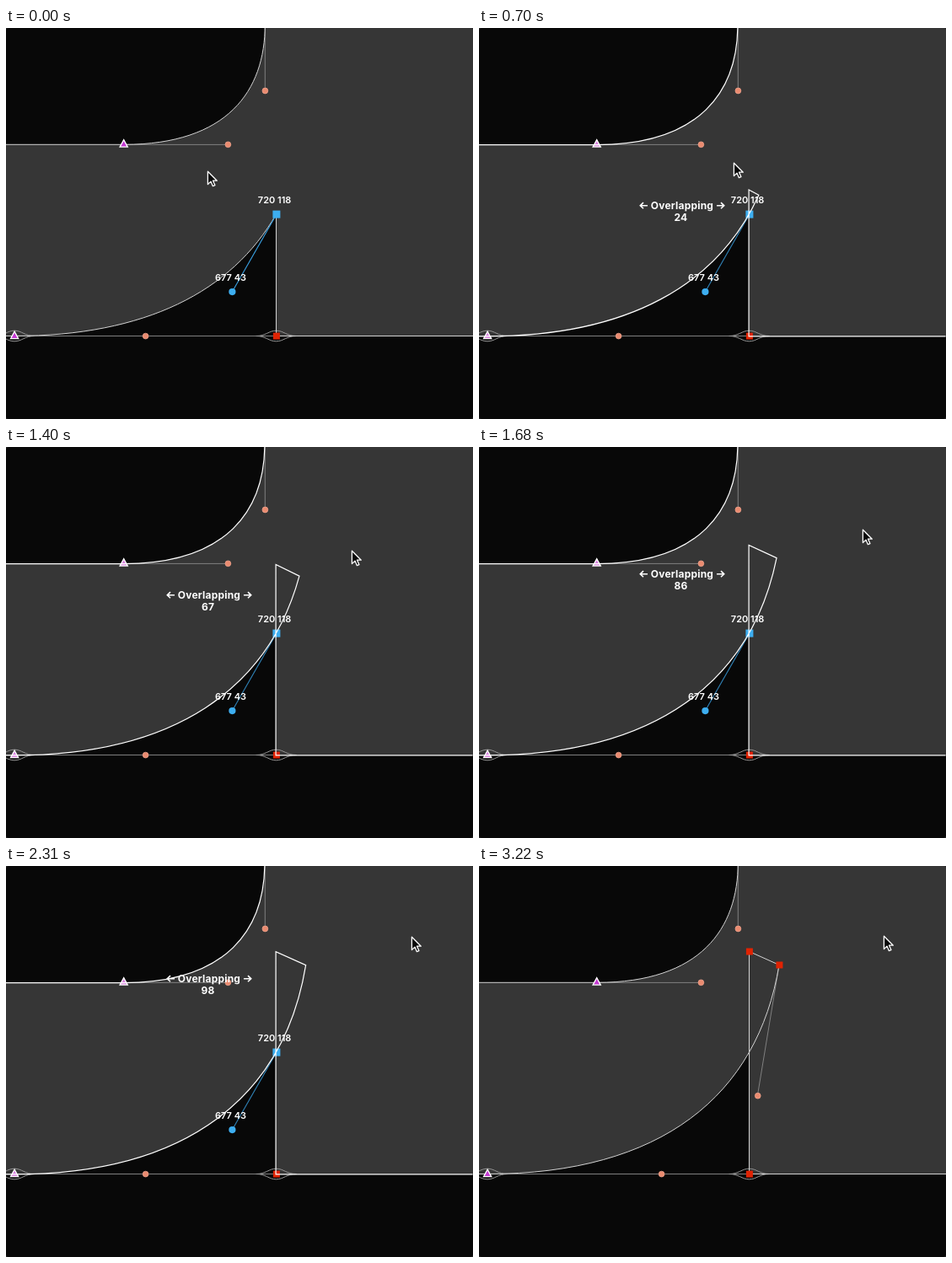
Write an HTML page that moves like this. It is 554 px wide and 464 px high and loops after 4200 ms.

```html
<!DOCTYPE html>
<html lang="en">
<head>
<meta charset="utf-8">
<title>Overlapping corner</title>
<style>
html, body { margin: 0; width: 100%; height: 100%; overflow: hidden; background: #262626; }
svg { display: block; width: 100%; height: 100%; border-radius: 3px; }
text { font-family: Inter, sans-serif; fill: #fff; text-anchor: middle; }
.coord { font-size: 11px; font-weight: 600; }
.tip { font-size: 12px; font-weight: 700; letter-spacing: .2px; }
.line { fill: none; stroke: #808080; stroke-width: 1; }
.thin { fill: none; stroke: #d4d4d4; stroke-width: 1; }
.bold { fill: none; stroke: #fff; stroke-width: 1.2; }
.handle { fill: #ea8b70; stroke: #f3a892; stroke-width: .7; }
.red { fill: #e02303; }
.blue { fill: #3daef0; }
.smooth { stroke: #fff; stroke-width: 1.3; }
</style>
</head>
<body>
<svg viewBox="0 0 554 464">
  <rect width="554" height="464" fill="#363636"/>
  <g fill="#080808">
    <path id="upper"/>
    <path d="M0 365.6H10C165 365.6 268 313 320.3 221V365.6H554V464H0Z"/>
  </g>
  <g class="line">
    <path d="M140 138.4H263M307.3 0V74M0 365.5H320"/>
    <path id="flares" stroke="#959595"/>
    <path id="arm"/>
  </g>
  <path id="outline" class="thin"/>
  <path id="blueArm" d="M320.8 221.2L268.4 313" stroke="#3aa2e4" stroke-width="1.1"/>
  <g id="marks" transform="translate(.4 .1)"></g>
  <path id="drag" class="bold" transform="translate(-.4 .3)"/>
  <g id="labels">
    <text class="coord" x="318.6" y="208">720 118</text>
    <text class="coord" x="266.5" y="300">677 43</text>
  </g>
  <g id="tip">
    <path d="M200 0H191.5M195 -3.6L191.3 0L195 3.6M282 0H290.5M287 -3.6L290.7 0L287 3.6"
      fill="none" stroke="#fff" stroke-width="1.6"/>
    <text class="tip" x="241" y="4">Overlapping</text>
    <text class="tip" id="amount" x="239.5" y="18"></text>
  </g>
  <path id="cursor" d="M.5 .5V15.8L4.1 12.4L6.5 18L9 16.9L6.6 11.5H11.4Z"
    fill="#080808" stroke="#fff" stroke-width="1.3" stroke-linejoin="round"/>
</svg>
<script>
const LOOP = 4200, STEP = 70, START = 350, NUDGE = 2870, DROP = 3150;
const UNIT = 1.22;      // pixels per font unit
const STRETCH = .00337; // curve parameter per font unit
const CORNER = [320.5, 221];
const CURVE = [[10, 365.5], [165, 365.5], [268, 313], CORNER];
const UPPER = "M0 138.3H140C263 138.3 307.3 74.3 307.3 -4";

// time, cursor x, cursor y, overlap, tip y
const KEYS = [
  [280, 240, 170, 0, 220],
  [700, 303, 160, 24, 210],
  [1120, 370, 143, 52, 193],
  [1400, 411, 123, 67, 175],
  [1680, 456, 98, 86, 150],
  [1820, 459, 97, 87, 149],
  [1960, 459, 97, 87, 149],
  [2310, 482, 84, 98, 133]
];

const $ = id => document.getElementById(id);
const mix = (a, b, t) => a + (b - a) * t;
const mixPoint = (a, b, t) => [mix(a[0], b[0], t), mix(a[1], b[1], t)];
const xy = p => p.map(v => v.toFixed(2)).join(" ");

function poseAt(t) {
  if (t <= KEYS[0][0]) return KEYS[0];
  const i = KEYS.findIndex(k => k[0] >= t);
  if (i < 0) return KEYS[KEYS.length - 1];
  const a = KEYS[i - 1], b = KEYS[i];
  return a.map((v, j) => mix(v, b[j], (t - a[0]) / (b[0] - a[0])));
}

// De Casteljau, also valid for t > 1
function extend([a, b, c, d], t) {
  const ab = mixPoint(a, b, t), bc = mixPoint(b, c, t), cd = mixPoint(c, d, t);
  const abc = mixPoint(ab, bc, t), bcd = mixPoint(bc, cd, t);
  return [a, ab, abc, mixPoint(abc, bcd, t)];
}

const flare = x =>
  [-6.3, 6.3].map(h => `M${x - 24} 365.5c12 0 15 ${h} 24 ${h}s12 ${-h} 24 ${-h}`).join("");
const outline = c => `${UPPER}M0 365.5H10C${c.slice(1).map(xy).join(" ")}`;
const dot = ([x, y]) => `<circle class="handle" cx="${x}" cy="${y}" r="3.4"/>`;
const box = ([x, y], kind, s = 8) =>
  `<rect class="${kind}" x="${x - s / 2}" y="${y - s / 2}" width="${s}" height="${s}"/>`;
const triangle = (x, y, fill) =>
  `<path class="smooth" fill="${fill}" d="M${x} ${y - 5.5}L${x + 4.6} ${y + 3}H${x - 4.6}Z"/>`;

function draw(time) {
  const t = Math.floor(time / STEP) * STEP;
  const dragging = t >= START && t < DROP, done = t >= DROP;
  const nudge = t >= NUDGE ? 1 : 0;
  const [, cx, cy, overlap, tipY] = poseAt(t);
  const n = Math.round(overlap);

  const curve = extend(CURVE, 1 + n * STRETCH);
  const top = [CORNER[0], CORNER[1] - n * UNIT];
  const path = outline(curve) + `L${xy(top)}V365.5H554`;
  $("outline").setAttribute("d", done ? path : dragging ? "" : outline(CURVE) + "V365.5H554");
  $("drag").setAttribute("d", dragging ? path : "");
  $("arm").setAttribute("d", done ? `M${xy(curve[3])}L${xy(curve[2])}` : "");

  const pink = dragging ? "#d983df" : "#c43ad2";
  let marks = dot([307, 74.4]) + dot([263, 138.2]) + triangle(139.3, 138, pink) +
    triangle(9.7, 365.5, pink) + box([320.5, 365.5], "red");
  marks += done
    ? dot(curve[1]) + dot(curve[2]) + box(top, "red") + box(curve[3], "red")
    : dot([165.2, 365.5]) + box(CORNER, "blue", 9) + '<circle class="blue" cx="268" cy="313" r="4.1"/>';
  $("marks").innerHTML = marks;

  const show = (id, on) => $(id).setAttribute("visibility", on ? "visible" : "hidden");
  show("labels", !done);
  show("blueArm", !done);
  show("tip", dragging);
  $("blueArm").setAttribute("opacity", dragging ? .8 : 1);
  $("tip").setAttribute("transform", `translate(0 ${Math.round(tipY) + .7})`);
  $("amount").textContent = n;
  $("cursor").setAttribute("transform",
    `translate(${Math.round(cx) - nudge - 1.1} ${Math.round(cy) - nudge - .3})`);
}

$("upper").setAttribute("d", UPPER + "H0Z");
$("flares").setAttribute("d", flare(10) + flare(320.5));
const begin = performance.now();
function tick() {
  draw((performance.now() - begin) % LOOP);
  requestAnimationFrame(tick);
}
tick();
</script>
</body>
</html>
```
